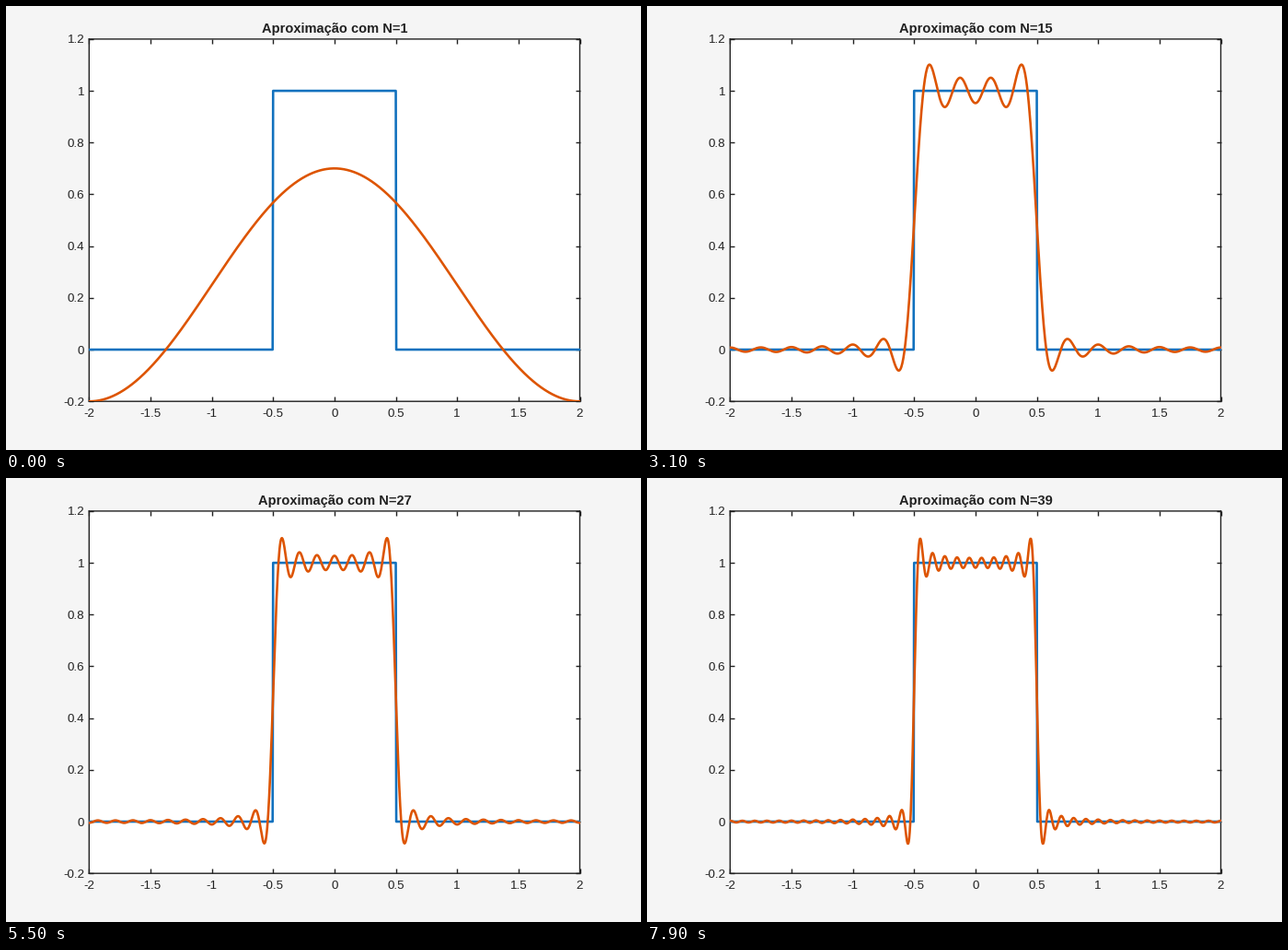
These frames come from a looping animation (690 px wide and 482 px high, 8 s). A matplotlib script:

```python
import numpy as np
import matplotlib.pyplot as plt
from matplotlib.animation import FuncAnimation

W, H, DPI = 690, 482, 100
LEFT, RIGHT, TOP, BOTTOM = 90.3, 623.5, 35.9, 429.2
STEP_MS, LOOP_MS = 100, 8000
FIRST_HOLD, HOLD = 500, 200
INK, BLUE, ORANGE = "#212121", "#1171be", "#dd5400"
PT = 72 / DPI  # points per pixel
FRAME_LW, DATA_LW = 1.4 * PT, 2.6 * PT

plt.rcParams["font.family"] = "Liberation Sans"


def fourier(x, terms):
    """Partial Fourier sum of a unit pulse of width 1 and period 4."""
    k = np.arange(1, terms + 1)[:, None]
    coeff = 2 / (np.pi * k) * np.sin(np.pi * k / 4)
    return 0.25 + (coeff * np.cos(np.pi * k * x / 2)).sum(axis=0)


def terms_at(ms):
    if ms < FIRST_HOLD:
        return 1
    return 2 + (ms - FIRST_HOLD) // HOLD


fig = plt.figure(figsize=(W / DPI, H / DPI), dpi=DPI, facecolor="#f5f5f5")
ax = fig.add_axes([LEFT / W, 1 - BOTTOM / H, (RIGHT - LEFT) / W, (BOTTOM - TOP) / H])
ax.set_xlim(-2, 2)
ax.set_ylim(-0.2, 1.2)

xticks = np.arange(-4, 5) / 2
yticks = np.arange(-1, 7) / 5
ax.set_xticks(xticks, [f"{v:g}" for v in xticks])
ax.set_yticks(yticks, [f"{v:g}" for v in yticks])
ax.tick_params(direction="in", top=True, right=True, length=5.3 * PT,
               width=FRAME_LW, color=INK, labelcolor=INK, labelsize=13.33 * PT)
ax.tick_params(axis="x", pad=8 * PT)
ax.tick_params(axis="y", pad=5 * PT)
for spine in ax.spines.values():
    spine.set(color=INK, linewidth=FRAME_LW, snap=False)

x = np.linspace(-2, 2, 1001)
pulse = (np.abs(x) <= 0.5 + 1e-9).astype(float)
ax.plot(x, pulse, color=BLUE, lw=DATA_LW, zorder=3, snap=False)
curve, = ax.plot(x, fourier(x, 1), color=ORANGE, lw=DATA_LW, zorder=4)
title = fig.text(357.2 / W, 1 - 29 / H, "", ha="center", va="baseline",
                 color=INK, weight="bold", size=14.67 * PT)


def update(frame):
    n = terms_at(frame * STEP_MS)
    curve.set_ydata(fourier(x, n))
    title.set_text(f"Aproximação com N={n}")
    return curve, title


anim = FuncAnimation(fig, update, frames=LOOP_MS // STEP_MS, interval=STEP_MS,
                     repeat=True, repeat_delay=0, blit=False)
plt.show()
```
